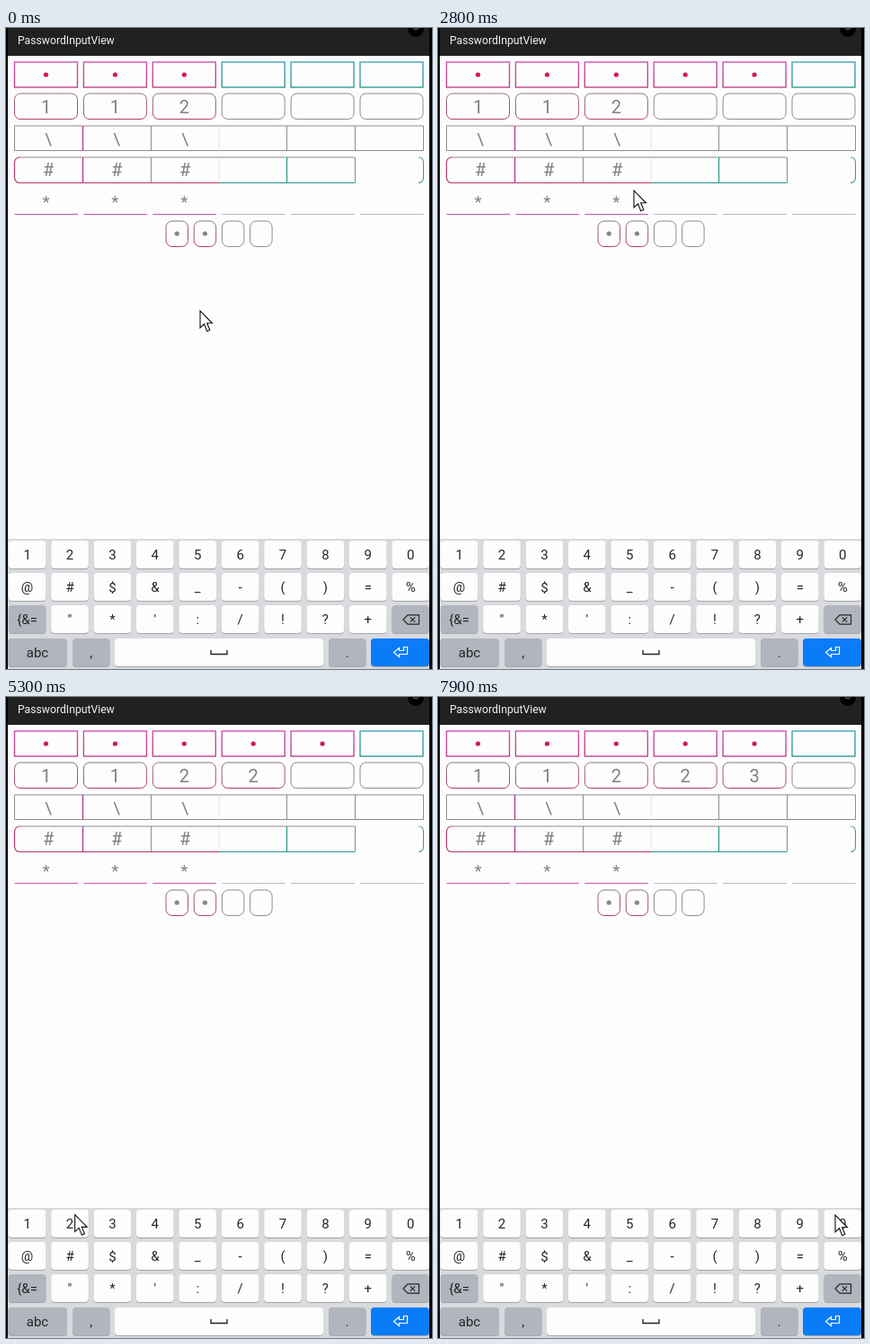
Recreate the animation shown at these times as an HTML page. Size 474 px wide and 714 px high, loop 8000 ms.

```html
<!DOCTYPE html>
<html lang="en">
<head>
<meta charset="utf-8">
<title>PasswordInputView</title>
<style>
html, body { margin: 0; width: 100%; height: 100%; overflow: hidden; background: #000; }
svg { display: block; width: 100vw; height: 100vh; }
text { font-family: Roboto, "Noto Sans", sans-serif; text-anchor: middle; }
</style>
</head>
<body>
<svg id="stage" viewBox="0 0 474 714">
  <defs>
    <linearGradient id="pink" x1="0" y1="0" x2="0" y2="1">
      <stop offset="0" stop-color="#d050b2"/><stop offset="1" stop-color="#bd4585"/>
    </linearGradient>
    <linearGradient id="teal" x1="0" y1="0" x2="0" y2="1">
      <stop offset="0" stop-color="#3fa6b8"/><stop offset="1" stop-color="#2f9990"/>
    </linearGradient>
    <linearGradient id="rose" x1="0" y1="0" x2="0" y2="1">
      <stop offset="0" stop-color="#8a7580"/><stop offset="1" stop-color="#b03c70"/>
    </linearGradient>
  </defs>
</svg>
<script>
const NS = 'http://www.w3.org/2000/svg';
const stage = document.getElementById('stage');
const LOOP = 8000, STEP = 100;
const GRAY = '#8c8c8c', INK = '#262626', CRIMSON = '#d0185c';

function add(tag, attrs, parent = stage) {
  const el = document.createElementNS(NS, tag);
  for (const k in attrs) el.setAttribute(k, attrs[k]);
  return parent.appendChild(el);
}
function box(x, y, width, height, attrs, parent) {
  return add('rect', { x, y, width, height, ...attrs }, parent);
}
function label(str, x, y, size, fill, parent) {
  const el = add('text', { x, y, 'font-size': size, fill }, parent);
  el.textContent = str;
  return el;
}
function stroke(d, color, width = 1, parent) {
  return add('path', { d, fill: 'none', stroke: color, 'stroke-width': width }, parent);
}
const show = (el, on) => el.setAttribute('visibility', on ? 'visible' : 'hidden');

// Window and title bar
box(2, 0, 469, 714, { fill: '#fdfdfd' });
box(2, 0, 469, 31, { fill: '#212121' });
label('PasswordInputView', 13, 18, 12.2, '#f2f2f2').style.textAnchor = 'start';
add('circle', { cx: 456, cy: 1, r: 9, fill: '#000' });
stroke('M453 0a3.5 3.5 0 0 0 6 0', '#777');

// Rows of separate cells; some are filled while typing
const dots = [], digits = [];
const values = [1, 1, 2, 2, 3];
for (let i = 0; i < 6; i++) {
  const x = 9.5 + 76.9 * i, mid = x + 35;
  const dotCell = box(x, 38, 70, 28, { fill: 'none', 'stroke-width': 1.4 });
  const dot = add('circle', { cx: mid, cy: 52, r: 2.6, fill: CRIMSON });
  dots.push({ cell: dotCell, mark: dot });
  const digitCell = box(x, 73, 70, 28.5, { rx: 6.5, fill: 'none' });
  const digit = label(values[i] ?? '', mid, 95, 20, '#808080');
  digits.push({ cell: digitCell, mark: digit });
  stroke(`M${x} 207.5h70.5`, i < 3 ? '#c957a4' : '#b9b9b9', 1.1);
  if (i < 3) label('*', mid, 200, 19, '#858585');
}

// Joined rows
stroke('M9.5 109H464.5M9.5 136.5H464.5M9.5 109V136.5M161.5 109V136.5M312.5 109V136.5M388.5 109V136.5M464.5 109V136.5', GRAY);
stroke('M237 109V136.5M237 144V172', '#e0e6e5');
stroke('M85.5 109V136.5M85.5 144V172', '#b83a98', 1.4);
stroke('M16 144H388.5V172M161.5 144V172', GRAY);
stroke('M16 144Q9.5 144 9.5 150.5V166Q9.5 172.5 16 172.5H237', '#b7366f', 1.2);
stroke('M237 172.5H388.5M312.5 144V172.5', '#2d968a', 1.2);
stroke('M459 144Q464.5 144 464.5 150V166.5Q464.5 172.5 459 172.5', '#4b9a91', 1.1);
for (let i = 0; i < 3; i++) {
  const mid = 47.2 + 76 * i;
  label('\\', mid, 130, 19, '#808080');
  label('#', mid, 165, 20, '#808080');
}

// Short four-cell row
for (let i = 0; i < 4; i++) {
  const x = 178 + 31.2 * i;
  box(x, 215, 24.5, 28.5, { rx: 7, fill: 'none', stroke: i < 2 ? 'url(#rose)' : GRAY });
  if (i < 2) add('circle', { cx: x + 12.2, cy: 229, r: 2.6, fill: '#858585' });
}

// Keyboard
const PITCH = 47.4, KEY = 41.6;
box(2, 570, 469, 144, { fill: '#d9dadd' });
stroke('M2 569.8H471', '#cfcfd2');
function key(x, y, w, text, fill = '#fdfdfd', size = 15) {
  box(x, y + 1, w, 31, { rx: 4, fill: '#a4a6aa' });
  box(x, y, w, 31, { rx: 4, fill });
  label(text, x + w / 2, y + 21, size, INK);
}
const FN = '#b1b5bd';
[['1234567890', 571], ['@#$&_-()=%', 607], [' "*\':/!?+ ', 643]].forEach(([row, y], r) => {
  [...row].forEach((ch, i) => {
    const edge = r === 2 && (i === 0 || i === 9);
    const text = edge && i === 0 ? '{&=' : ch;
    key(2.8 + PITCH * i, y, KEY, text, edge ? FN : undefined);
  });
});
key(2, 680, 66, 'abc', FN);
key(74, 680, 41.5, ',', FN);
key(121, 680, 232, '');
key(359, 680, 41.5, '.', FN);
key(406, 680, 65, '', '#0a7cf8');
stroke('M228 693V697.5H246V693', INK, 1.4);
stroke('M442 659L447 653.8H459.5V664.2H447ZM449.8 656.3L455.2 661.7M455.2 656.3L449.8 661.7', INK, 1.2);
stroke('M442.5 689.5H446.5V697.5H437.5V700.5L431.5 695.5L437.5 690.5V693.5H442.5Z', '#fff', 1.2);
box(471, 0, 3, 714, { fill: '#000' });

// Key preview bubble
const popup = add('g', {});
box(-24, 537, 48, 66, { rx: 5, fill: '#c9cacd' }, popup);
box(-23.2, 537.6, 46.4, 64.4, { rx: 4.5, fill: '#fdfdfd' }, popup);
const popupText = label('', 0, 563, 20, '#0a74d2', popup);

const pointer = add('path', {
  d: 'M0 0V19L4.5 14.8 7.7 22.8 10.8 21.5 7.7 13.8H13.5Z',
  fill: '#fff', stroke: '#111', 'stroke-width': 1.1
});

const presses = [
  { key: 3, from: 1700, to: 2000 },
  { key: 5, from: 2200, to: 2500 },
  { key: 2, from: 4900, to: 5200 },
  { key: 3, from: 5900, to: 6300 }
];
const dotTimes = [0, 0, 0, 1700, 2300, Infinity];
const digitTimes = [0, 0, 0, 4900, 5900, Infinity];

// Pointer stops: time, x, y
const stops = [
  [0, 216, 315], [1000, 121, 578], [2000, 121, 580], [2200, 212, 584],
  [2500, 212, 584], [2800, 218, 181], [3400, 265, 73], [3600, 265, 73],
  [4400, 77, 562], [4500, 69, 574], [5200, 69, 575], [5600, 118, 585],
  [5900, 118, 585], [6200, 399, 138], [6600, 399, 138], [6700, 371, 140],
  [6900, 258, 116], [7100, 258, 116], [7900, 442, 577], [8000, 442, 577]
];
const ease = u => u * u * (3 - 2 * u);
function pointerAt(t) {
  const n = stops.findIndex(s => s[0] > t);
  const [t0, x0, y0] = stops[n - 1], [t1, x1, y1] = stops[n];
  const u = ease((t - t0) / (t1 - t0));
  return [x0 + (x1 - x0) * u, y0 + (y1 - y0) * u];
}

function render(ms) {
  const t = Math.floor(ms % LOOP / STEP) * STEP;
  dots.forEach(({ cell, mark }, i) => {
    const on = t >= dotTimes[i];
    cell.setAttribute('stroke', on ? 'url(#pink)' : 'url(#teal)');
    show(mark, on);
  });
  digits.forEach(({ cell, mark }, i) => {
    const on = t >= digitTimes[i];
    cell.setAttribute('stroke', on ? 'url(#rose)' : GRAY);
    show(mark, on);
  });
  const press = presses.find(p => t >= p.from && t < p.to);
  show(popup, press);
  if (press) {
    popup.setAttribute('transform', `translate(${24 + PITCH * (press.key - 1)} 0)`);
    popupText.textContent = press.key;
  }
  pointer.setAttribute('transform', `translate(${pointerAt(t)})`);
}

const start = performance.now();
function tick() {
  render(performance.now() - start);
  requestAnimationFrame(tick);
}
tick();
</script>
</body>
</html>
```
